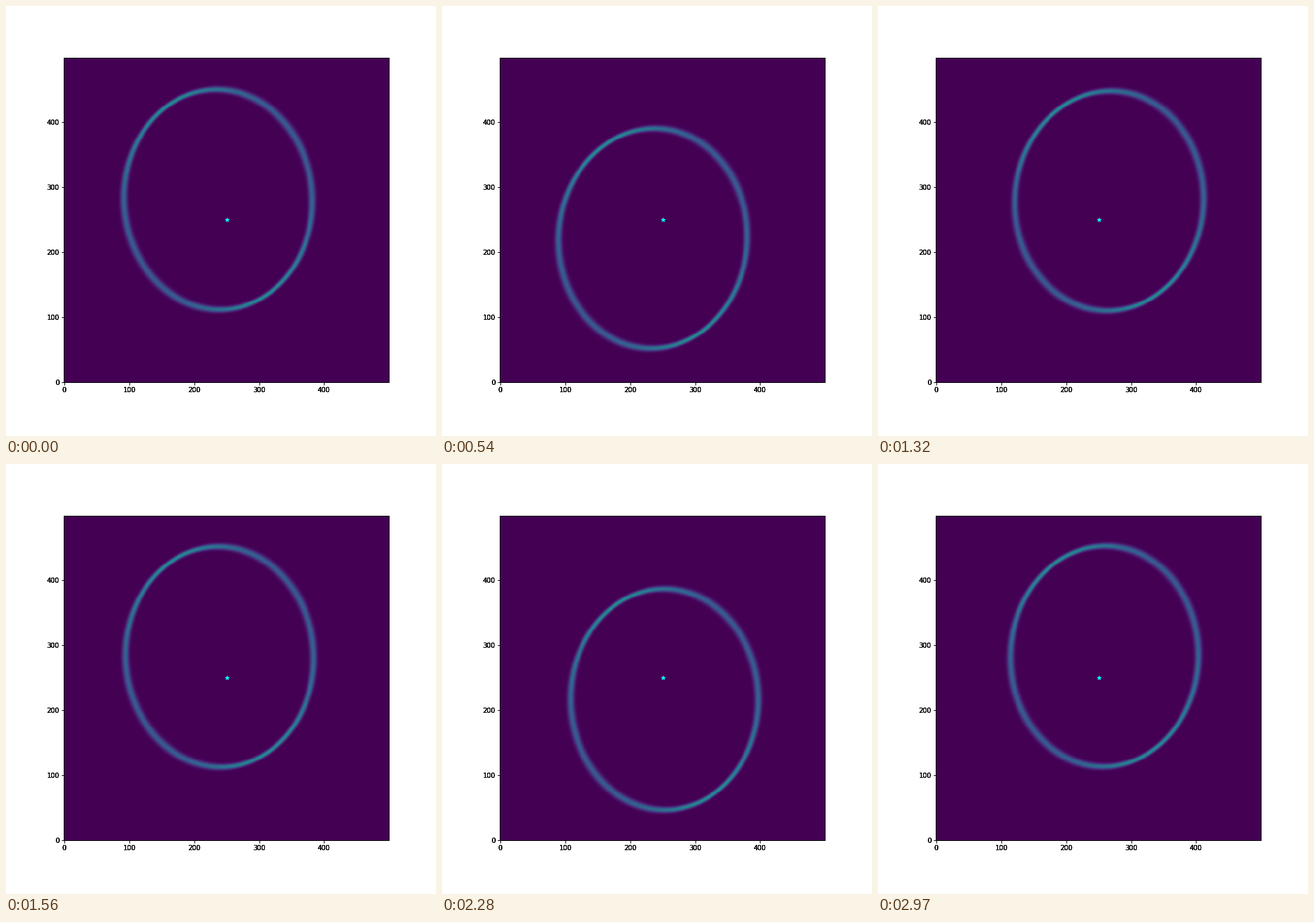
These frames come from a looping animation (648x648 px, 3000 ms). A matplotlib script:

```python
import numpy as np
import matplotlib.pyplot as plt
from matplotlib.animation import FuncAnimation

SIZE = 500
FRAMES = 100
STAR = 250
SEMI_MAJOR, ECC = 170, 0.2
COS_I = np.cos(np.radians(30))
START, STEP = np.radians(116.4), np.radians(6.83)

# Elongated Gaussian beam that blurs the thin ring
BEAM_MAJ, BEAM_MIN, BEAM_ANGLE = 3.9, 2.2, np.radians(36)
FLUX = 1.1

grid = np.arange(SIZE, dtype=np.float32) - STAR
X, Y = np.meshgrid(grid / COS_I, grid)


def ring(i):
    """Inclined eccentric ring with one focus on the star, precessing."""
    w = START + STEP * i
    c, s = np.float32(np.cos(w)), np.float32(np.sin(w))
    a, b = SEMI_MAJOR, SEMI_MAJOR * np.sqrt(1 - ECC**2)
    u = (X * c + Y * s - a * ECC) / np.float32(a)
    v = (Y * c - X * s) / np.float32(b)
    rho = np.hypot(u, v) + np.float32(1e-6)

    # Gradient of rho in sky coordinates gives the distance and the normal
    gu, gv = u / (rho * np.float32(a)), v / (rho * np.float32(b))
    gx = (gu * c - gv * s) / np.float32(COS_I)
    gy = gu * s + gv * c
    g2 = gx**2 + gy**2 + np.float32(1e-12)

    ca, sa = np.float32(np.cos(BEAM_ANGLE)), np.float32(np.sin(BEAM_ANGLE))
    along = (gx * ca + gy * sa) ** 2 / g2
    var = BEAM_MIN**2 + (BEAM_MAJ**2 - BEAM_MIN**2) * along
    return FLUX / np.sqrt(var) * np.exp(-((rho - 1) ** 2) / (2 * g2 * var))


fig = plt.figure(figsize=(9, 9), dpi=72, facecolor="white")
side = 0.755
box = [0.5125 - side / 2, 0.125, side, side]


def add_axes():
    ax = fig.add_axes(box, facecolor="none")
    ax.set(xlim=(-0.5, SIZE - 0.5), ylim=(-0.5, SIZE - 0.5),
           xticks=range(0, SIZE, 100), yticks=range(0, SIZE, 100))
    ax.tick_params(labelsize=10)
    return ax


ax = add_axes()
image = ax.imshow(ring(0), origin="lower", cmap="viridis", vmin=0, vmax=1,
                  interpolation="nearest", aspect="auto")
ax.scatter([STAR], [STAR], s=36, marker="*", color="cyan", zorder=3)

# Overprinted axes give the heavy labels
for _ in range(3):
    add_axes()


def update(i):
    image.set_data(ring(i))
    return [image]


anim = FuncAnimation(fig, update, frames=FRAMES, interval=30,
                     repeat=True, repeat_delay=0, blit=False)
plt.show()
```
